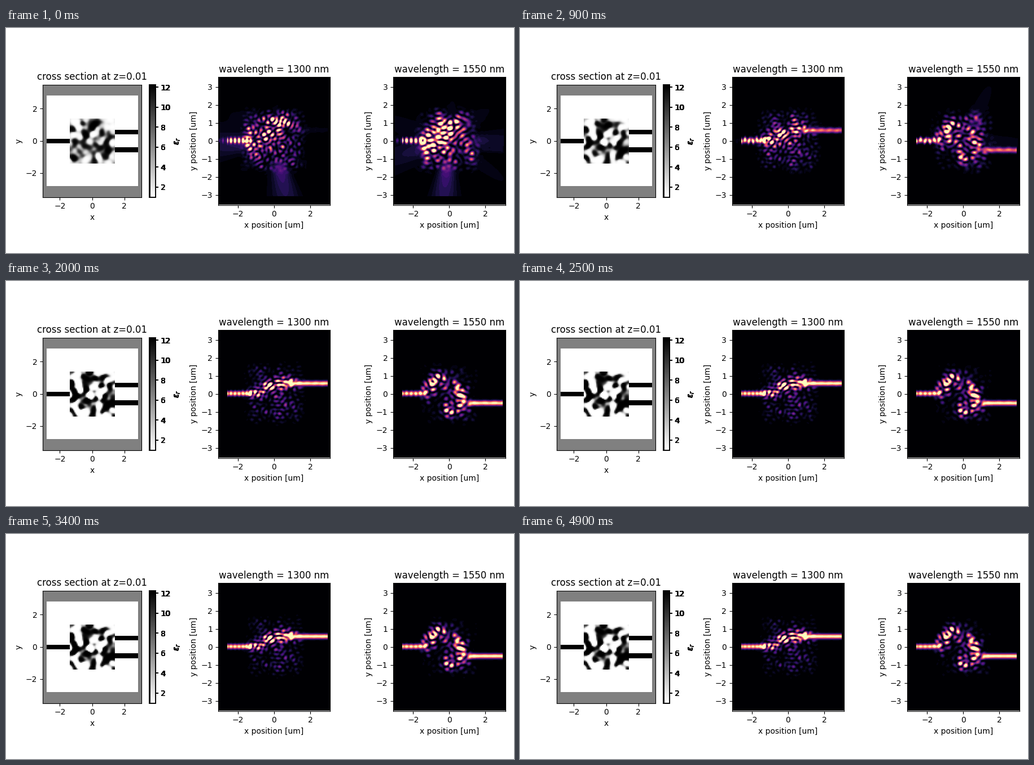
Animation of 900x400 px, one loop 5 s. Source, as a matplotlib script:

```python
import numpy as np
import matplotlib.pyplot as plt
from matplotlib.animation import FuncAnimation
from matplotlib.patches import Rectangle

W, H, DPI, FRAMES = 900, 400, 100, 50
plt.rcParams["font.family"] = "DejaVu Sans"
fig = plt.figure(figsize=(W / DPI, H / DPI), dpi=DPI, facecolor="white")


def axes_px(left, top, width, height):
    return fig.add_axes([left / W, 1 - (top + height) / H, width / W, height / H])


def smooth(u):
    u = np.clip(u, 0, 1)
    return u * u * (3 - 2 * u)


# ---------------------------------------------------------------- structure
ax = axes_px(65, 100.6, 175, 200)
ax.set(xlim=(-3.0625, 3.0625), ylim=(-3.5, 3.5), xlabel="x", ylabel="y",
       xticks=[-2, 0, 2], yticks=[-2, 0, 2], facecolor="#808080")
ax.set_title("cross section at z=0.01")


def box(x0, x1, y0, y1, color):
    ax.add_patch(Rectangle((x0, y0), x1 - x0, y1 - y0, fc=color, lw=0))


box(-2.82, 2.84, -2.82, 2.82, "white")
box(-2.82, -1.4, -0.14, 0.14, "black")
for yc in (-0.55, 0.55):
    box(1.4, 2.84, yc - 0.15, yc + 0.15, "black")

cells = np.arange(40)
blur = np.exp(-((cells[:, None] - cells) ** 2) / (2 * 1.9**2))


def random_design(seed):
    """Blurred noise with zero mean and unit spread."""
    noise = blur @ np.random.default_rng(seed).normal(size=(40, 40)) @ blur
    return (noise - noise.mean()) / noise.std()


start_design, change = random_design(5), random_design(12)
design = ax.imshow(start_design, cmap="binary", vmin=0, vmax=1, aspect="auto",
                   extent=(-1.4, 1.4, -1.4, 1.4), interpolation="nearest", zorder=3)

# Stacked colorbars give the heavy labels and ticks.
scale = plt.cm.ScalarMappable(plt.Normalize(1, 12.25), "binary")
for k in range(6):
    cax = axes_px(254 + 0.5 * (k % 2), 100.6, 10, 200)
    bar = fig.colorbar(scale, cax=cax, ticks=range(2, 13, 2))
    bar.set_label(r"$\epsilon_r$")
    bar.outline.set_linewidth(1.3)
    cax.tick_params(width=1.3)

# ------------------------------------------------------------------- fields
px, py = np.linspace(-99, 99, 199), np.linspace(-113.5, 113.5, 228)
PX, PY = np.meshgrid(px, py)
R, THETA = np.hypot(PX, PY), np.arctan2(PY, PX)
DOMAIN = (np.abs(PY) < 99) & (np.abs(PX) < 97)
DESIGN = np.exp(-(PX / 49) ** 6 - (PY / 50) ** 6)
OUTSIDE = smooth((R - 28) / 24) * (50 / np.maximum(R, 50)) ** 0.8 * DOMAIN


def ridge(path, width):
    """Soft band along a polyline."""
    near = np.full_like(PX, np.inf)
    for (x0, y0), (x1, y1) in zip(path, path[1:]):
        dx, dy = x1 - x0, y1 - y0
        s = np.clip(((PX - x0) * dx + (PY - y0) * dy) / (dx * dx + dy * dy), 0, 1)
        near = np.minimum(near, (PX - x0 - s * dx) ** 2 + (PY - y0 - s * dy) ** 2)
    return np.exp(-near / (2 * width**2))


class Field:
    """Scattered light in the design, its radiation, and the guided beams."""

    def __init__(self, seed, period, exit_y, exit_x, early, late, waves=24):
        rng = np.random.default_rng(seed)
        angle = rng.uniform(0, 2 * np.pi, waves)
        k = 2 * np.pi / period
        self.along_x = np.exp(1j * k * np.outer(np.cos(angle), px))
        self.along_y = np.exp(1j * k * np.outer(py, np.sin(angle)))
        self.phase = rng.uniform(0, 2 * np.pi, waves)
        self.drift = rng.uniform(-4, 4, waves)
        self.orders = np.arange(-6, 7)
        self.petals = rng.normal(size=13) + 1j * rng.normal(size=13)
        self.early, self.late = early, late
        self.beat, self.exit_y, self.exit_x = period / 2, exit_y, exit_x

    def speckle(self, i):
        weights = np.exp(1j * (self.phase + self.drift * np.exp(-i / 7)))
        field = (self.along_y * weights) @ self.along_x
        return np.abs(field) ** 2 / len(weights) * DESIGN

    def radiation(self, i):
        turn = np.exp(0.25j * i * np.sin(3 * self.orders))
        field = sum(c * np.exp(1j * m * THETA)
                    for m, c in zip(self.orders, self.petals * turn))
        return 0.055 * np.exp(-i / 7) * np.abs(field) ** 2 / 26 * OUTSIDE

    def guides(self, i):
        ripple = 0.08 + 0.82 * np.exp(-i / 13)
        wiggle = 2 * (i / 4) * np.exp(1 - i / 4)
        wave = 2 * np.pi * (PX + 84) / self.beat
        y_in = wiggle * np.sin(wave / 1.4)
        beam = 0.92 * (1 + ripple * np.cos(wave)) * np.exp(-((PY - y_in) / 4.1) ** 2)
        beam *= smooth((-37 - PX) / 8)
        beam *= np.where(PX < -83, 0.13 * np.exp(-i / 5), 1)
        power = 0.04 + 0.98 * (1 - np.exp(-(i / 9) ** 1.5))
        tail = 0.2 * np.exp(-i / 14)
        y_out = self.exit_y + 3 * tail * np.sin(wave / 2.3)
        out = power * (1 + tail * np.cos(wave / 2)) * np.exp(-((PY - y_out) / 4.1) ** 2)
        return beam + out * smooth((PX - self.exit_x) / 10) * (PX < 95)

    def at(self, i):
        mix = smooth((i - 2) / 12)
        path = self.early + (self.late - self.early) * mix
        level = 0.05 + 0.11 * np.exp(-i / 11) + 0.55 * path
        return level * self.speckle(i) + self.radiation(i) + self.guides(i)


def field_panel(left, nm):
    panel = axes_px(left, 86.9, 198.75, 227.6)
    image = panel.imshow(np.zeros_like(PX), cmap=plt.get_cmap("magma", 28), vmin=0,
                         vmax=1, aspect="auto", extent=(-3.1, 3.1, -3.55, 3.55),
                         interpolation="nearest")
    panel.set(xlabel="x position [um]", ylabel="y position [um]",
              xticks=[-2, 0, 2], yticks=range(-3, 4))
    panel.set_title(f"wavelength = {nm} nm")
    return image


short_wave = Field(
    3, 14.2, -18, 18,
    early=ridge([(-42, 0), (-15, -5), (14, -36)], 12),
    late=ridge([(-42, 0), (-22, -5), (0, -19), (30, -18)], 6))
long_wave = Field(
    8, 16.4, 17, 29,
    early=ridge([(-42, 0), (-10, -3), (13, -30)], 14),
    late=ridge([(-42, -2), (-20, -25), (12, -6), (28, 14), (0, 32)], 9))
panels = [(field_panel(375.6, 1300), short_wave),
          (field_panel(686, 1550), long_wave)]


def update(i):
    turn = 0.95 * smooth(i / 15)
    pattern = np.cos(turn) * start_design + np.sin(turn) * change
    contrast = 1.3 + 0.9 * smooth(i / 20)
    design.set_data(0.5 + 0.5 * np.tanh(contrast * (pattern - 0.1)))
    for image, light in panels:
        image.set_data(light.at(i))
    return [design] + [image for image, _ in panels]


anim = FuncAnimation(fig, update, frames=FRAMES, interval=100, repeat=True)
plt.show()
```
